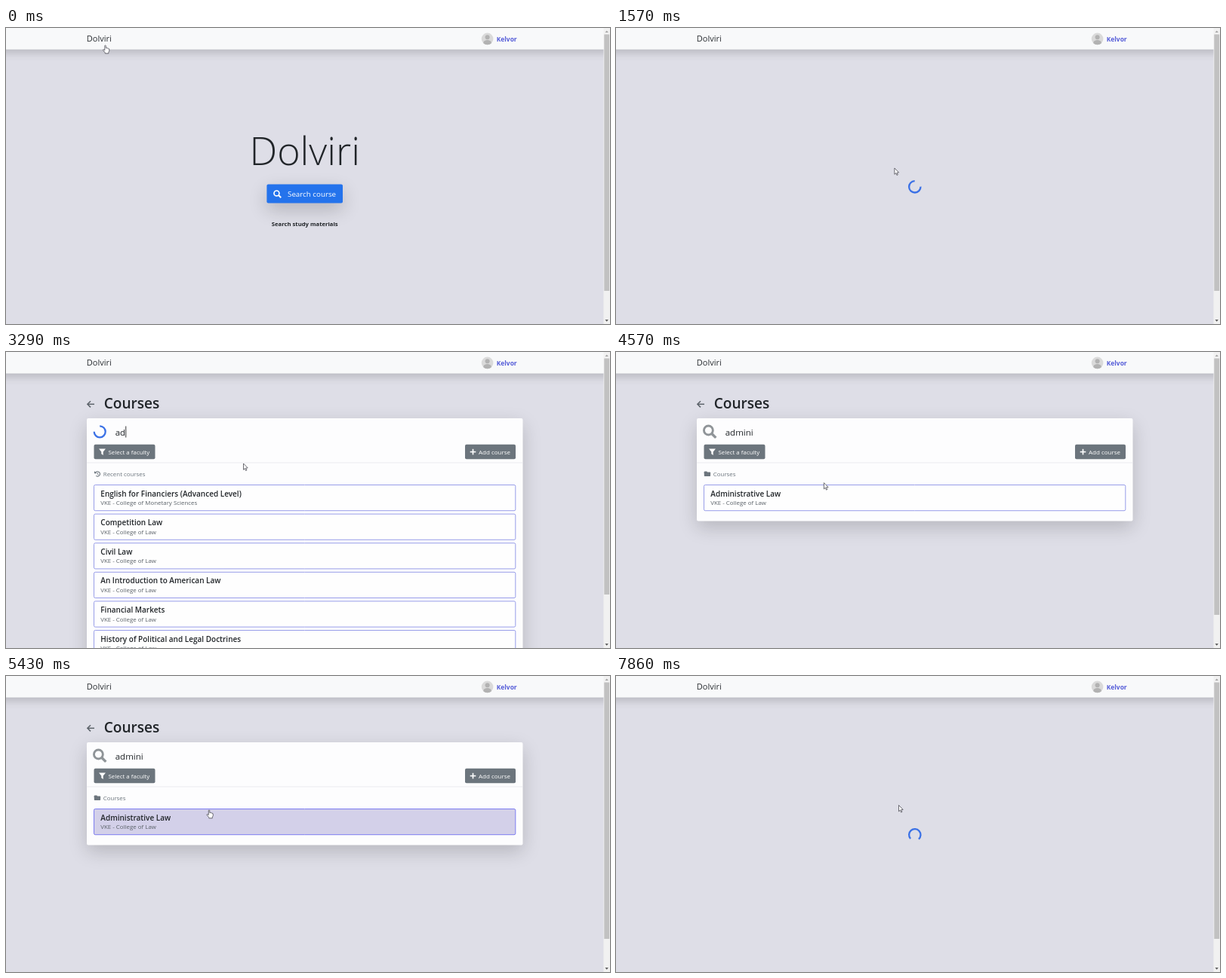
Write an HTML page with a canvas that moves like this. It is 800 px wide and 393 px high and loops after 8000 ms.

```html
<!DOCTYPE html>
<html lang="en">
<head>
<meta charset="utf-8">
<title>Course search</title>
<style>
  html, body { margin: 0; width: 100%; height: 100%; overflow: hidden; background: #dedee7; }
  canvas { display: block; width: 800px; height: 393px; }
</style>
</head>
<body>
<canvas id="stage"></canvas>
<script>
const W = 800, H = 393, LOOP = 8000, FPS = 7;
const SANS = '"Open Sans", "Noto Sans", sans-serif';
const SITE = 'Dolviri', USER = 'Kelvor', SCHOOL = 'VKE - College of ';
const GRAY = '#6c757d', INK = '#212529', BLUE = '#3b71e6';

const COURSES = [
  ['English for Financiers (Advanced Level)', 'Monetary Sciences'],
  ['Competition Law', 'Law'],
  ['Civil Law', 'Law'],
  ['An Introduction to American Law', 'Law'],
  ['Financial Markets', 'Law'],
  ['History of Political and Legal Doctrines', 'Law']
];
const QUERY = 'admini';
const KEY_TIMES = [2710, 2860, 3430, 3500, 3570, 3710];
const LOADING = 1430, LIST = 1710, RESULTS = 4000, OPENED = 5570;

// Pointer hot spot: time, x, y
const POINTER = [
  [0, 131.5, 23], [80, 131.5, 23], [860, 418, 217], [1000, 420.5, 222],
  [1290, 420.5, 222], [1860, 314.5, 148], [4000, 314.5, 148],
  [4710, 271, 176.5], [4860, 270.3, 177.5], [5140, 269, 178], [5430, 269, 178],
  [6000, 263.3, 169.5], [6430, 263.3, 169.5], [7570, 343, 171], [7860, 374.5, 171.5]
];

const canvas = document.getElementById('stage');
const ctx = canvas.getContext('2d');
const dpr = window.devicePixelRatio || 1;
canvas.width = W * dpr;
canvas.height = H * dpr;

function text(str, x, y, size, color, weight = 400, align = 'left') {
  ctx.font = `${weight} ${size}px ${SANS}`;
  ctx.fillStyle = color;
  ctx.textAlign = align;
  ctx.fillText(str, x, y);
}

function rect(x, y, w, h, color) {
  ctx.fillStyle = color;
  ctx.fillRect(x, y, w, h);
}

function box(x, y, w, h, r, fill, border) {
  ctx.beginPath();
  ctx.roundRect(x, y, w, h, r);
  ctx.fillStyle = fill;
  ctx.fill();
  if (border) {
    ctx.strokeStyle = border;
    ctx.lineWidth = 1;
    ctx.stroke();
  }
}

function shadowed(dy, blur, alpha, draw) {
  ctx.save();
  ctx.shadowColor = `rgba(0,0,0,${alpha})`;
  ctx.shadowOffsetY = dy * dpr;
  ctx.shadowBlur = blur * dpr;
  draw();
  ctx.restore();
}

function trace(points, close) {
  ctx.beginPath();
  points.forEach(([x, y]) => ctx.lineTo(x, y));
  if (close) ctx.closePath();
}

function polygon(points, color) {
  trace(points, true);
  ctx.fillStyle = color;
  ctx.fill();
}

function line(points, color, width) {
  trace(points, false);
  ctx.strokeStyle = color;
  ctx.lineWidth = width;
  ctx.stroke();
}

function arc(x, y, r, from, to, color, width) {
  ctx.beginPath();
  ctx.arc(x, y, r, from, to);
  ctx.strokeStyle = color;
  ctx.lineWidth = width;
  ctx.stroke();
}

function disc(x, y, r, color) {
  ctx.beginPath();
  ctx.arc(x, y, r, 0, Math.PI * 2);
  ctx.fillStyle = color;
  ctx.fill();
}

function magnifier(x, y, size, color) {
  const r = size * 0.33, c = -size * 0.1;
  arc(x + c, y + c, r, 0, Math.PI * 2, color, size * 0.16);
  line([[x + c + r * 0.75, y + c + r * 0.75], [x + size * 0.45, y + size * 0.45]], color, size * 0.19);
}

// Three-quarter ring, one turn in 750 ms; gap is its middle angle in degrees at time zero
function spinner(x, y, r, t, gap) {
  const mid = (gap / 360 + t / 750) * Math.PI * 2;
  arc(x, y, r, mid + Math.PI / 4, mid + Math.PI * 1.75, BLUE, 2.3);
}

function scrollbar(thumbEnd) {
  rect(791.5, 0, 8.5, H, '#f1f1f1');
  rect(792.3, 8.5, 6.9, thumbEnd - 8.5, '#c1c1c1');
  polygon([[793.5, 6], [795.7, 3.5], [797.9, 6]], '#a3a3a3');
  polygon([[793.5, 387.3], [795.7, 389.8], [797.9, 387.3]], '#505050');
}

function navbar() {
  shadowed(4, 11, 0.18, () => rect(-20, -10, 840, 38.5, '#f8f9fa'));
  text(SITE, 106.8, 18.4, 11, '#2b2f33');
  disc(637.6, 14.4, 7.8, '#dadada');
  ctx.save();
  ctx.beginPath();
  ctx.arc(637.6, 14.4, 7.8, 0, Math.PI * 2);
  ctx.clip();
  disc(637.6, 12.2, 3, '#b2b2b2');
  ctx.beginPath();
  ctx.ellipse(637.6, 20.6, 5.5, 4.6, 0, 0, Math.PI * 2);
  ctx.fill();
  ctx.restore();
  text(USER, 649.8, 17.7, 8.4, '#545cd8', 700);
}

function home(hover) {
  text(SITE, 395.7, 182, 52, INK, 300, 'center');
  shadowed(8.5, 25, 0.2, () => box(345.4, 207.4, 100.6, 25.2, 2, hover ? '#0765d2' : '#2473ec'));
  magnifier(359.5, 220.5, 10.5, hover ? '#e3ecfa' : '#fff');
  text('Search course', 373, 224.3, 9.8, hover ? '#e3ecfa' : '#fff');
  text('Search study materials', 395.7, 263, 7.7, INK, 700, 'center');
}

function courseRow([title, faculty], y, hover) {
  box(116.5, y, 558.3, 34.2, 1.8, hover ? '#d3d0e9' : '#fefefe', hover ? '#7d7cf0' : '#989de9');
  text(title, 125.3, y + 15, 10, INK, 600);
  text(SCHOOL + faculty, 125.3, y + 26.7, 7.9, '#5b6269');
}

function historyIcon(x, y) {
  arc(x, y, 3.2, -2.6, 2.3, GRAY, 1.1);
  polygon([[x - 4.3, y - 3.8], [x - 4.3, y - 0.7], [x - 1.2, y - 0.7]], GRAY);
  line([[x, y - 1.8], [x, y + 0.3], [x + 1.5, y + 1.2]], GRAY, 0.9);
}

function folderIcon(x, y) {
  box(x, y + 1, 8.3, 5.6, 0.8, GRAY);
  box(x, y, 4, 3, 0.8, GRAY);
}

function coursesPage(t, hover) {
  const found = t >= RESULTS;
  line([[117, 69.3], [108.3, 69.3]], '#5c636a', 1.5);
  line([[112, 65.2], [107.9, 69.3], [112, 73.4]], '#5c636a', 1.5);
  text('Courses', 129.7, 75, 19.1, INK, 600);

  shadowed(8.5, 25, 0.18, () => box(107, 88, 577.5, found ? 136.5 : 340, 2, '#fdfdfe'));

  const typed = QUERY.slice(0, KEY_TIMES.filter(k => k <= t).length);
  if (typed && !found) spinner(124.2, 105.8, 7.5, t - 3290, 225);
  else magnifier(124.2, 105.8, 18, '#8f9498');

  if (typed) {
    text(typed, 144.7, 110.8, 11.5, INK);
    const lastKey = KEY_TIMES[typed.length - 1];
    if (Math.floor((t - lastKey) / 530) % 2 === 0) {
      rect(144.9 + ctx.measureText(typed).width, 98.5, 0.9, 15, '#222');
    }
  } else {
    text('Search course...', 144.7, 110.8, 11.5, GRAY);
  }

  box(116.5, 122.7, 81, 19.6, 2, GRAY);
  polygon([[123, 128.6], [132, 128.6], [128.7, 132.6], [128.7, 137], [126.3, 135.2], [126.3, 132.6]], '#fff');
  text('Select a faculty', 135.4, 135.6, 7.95, '#fff');
  box(608, 122.7, 67, 19.6, 2, GRAY);
  rect(614.7, 131.8, 7.6, 1.6, '#fff');
  rect(617.7, 128.8, 1.6, 7.6, '#fff');
  text('Add course', 626, 135.6, 8, '#fff');
  rect(107, 146.6, 577.5, 0.8, '#e6e6ea');

  if (found) {
    folderIcon(116.8, 158.5);
    text('Courses', 128.8, 164.8, 7.9, GRAY, 500);
    courseRow(['Administrative Law', 'Law'], 176.5, hover);
  } else {
    historyIcon(121.3, 161.9);
    text('Recent courses', 128.8, 164.8, 7.9, GRAY, 500);
    COURSES.forEach((course, i) => courseRow(course, 176.5 + i * 38.6));
  }
}

function pointerAt(t) {
  const next = POINTER.findIndex(p => p[0] > t);
  if (next < 0) return POINTER[POINTER.length - 1].slice(1);
  const [t0, x0, y0] = POINTER[next - 1], [t1, x1, y1] = POINTER[next];
  const u = (t - t0) / (t1 - t0), e = u * u * (3 - 2 * u);
  return [x0 + (x1 - x0) * e, y0 + (y1 - y0) * e];
}

const ARROW = [[0, 0], [0, 8.3], [1.9, 6.6], [3.1, 9.5], [4.4, 8.9], [3.2, 6.1], [5.7, 5.9]];
const HAND = [
  [-0.7, 0.4], [0, 0], [0.8, 0.5], [0.9, 3.6], [2.4, 3.6], [3.8, 4.1], [5.1, 4.7],
  [5.3, 7.4], [4.4, 9.2], [4.3, 10.8], [-0.2, 10.8], [-0.4, 9.5], [-2.8, 6.7],
  [-2.8, 5.8], [-1.8, 5.6], [-0.7, 6.6]
];

function pointer(x, y, isHand) {
  ctx.save();
  ctx.translate(x, y);
  ctx.lineJoin = 'round';
  polygon(isHand ? HAND : ARROW, '#fff');
  ctx.strokeStyle = '#4a4a52';
  ctx.lineWidth = 0.8;
  ctx.stroke();
  ctx.restore();
}

function draw(t) {
  ctx.setTransform(dpr, 0, 0, dpr, 0, 0);
  rect(0, 0, W, H, '#dedee7');
  const [x, y] = pointerAt(t);
  const isHome = t < LOADING, isList = t >= LIST && t < OPENED;
  const onButton = isHome && x > 345 && y > 207;
  const onRow = isList && t >= RESULTS && y >= 176.5;
  const onSite = isHome && y < 28 && x < 142;

  if (isHome) home(onButton);
  else if (isList) coursesPage(t, onRow);
  else spinner(395.8, 210.8, 7.7, t - 7860, 93);

  navbar();
  scrollbar(isList && t < RESULTS ? 322 : 349);
  pointer(x, y, onButton || onRow || onSite);
}

// The picture advances in held steps, seven per second
function tick() {
  const step = Math.floor(((performance.now() % LOOP) + 5) * FPS / 1000) % (LOOP * FPS / 1000);
  draw(Math.round(step * 100 / FPS) * 10);
  requestAnimationFrame(tick);
}
tick();
</script>
</body>
</html>
```
